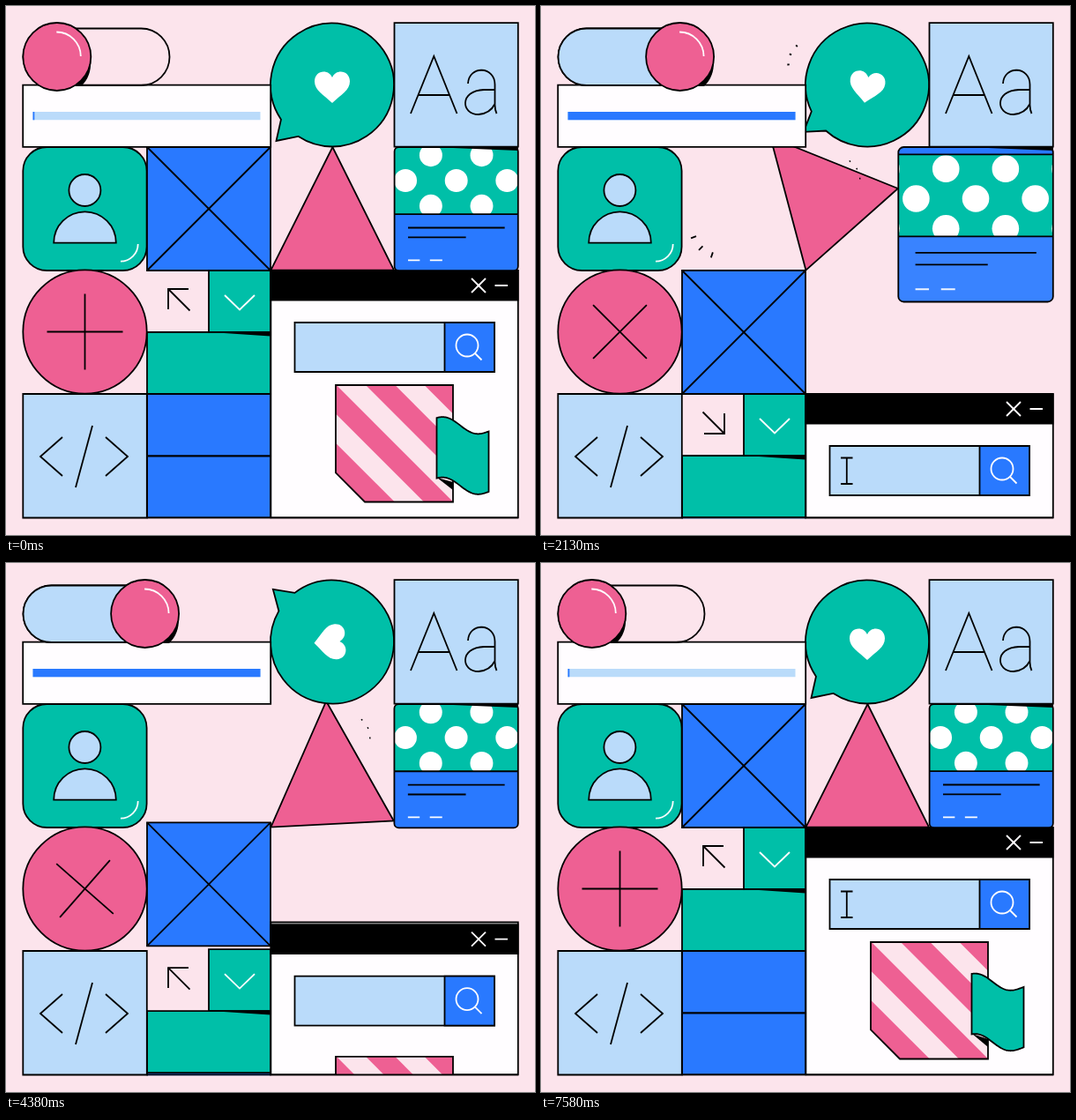
An HTML page with a canvas for the animation above (7.62 s loop, 600 by 600 pixels).

```html
<!DOCTYPE html>
<html lang="en">
<head>
<meta charset="utf-8">
<title>Interface blocks</title>
<style>
html, body { margin: 0; width: 100%; height: 100%; overflow: hidden; background: #fce4ec; }
canvas { display: block; }
</style>
</head>
<body>
<canvas id="stage" width="600" height="600"></canvas>
<script>
const g = document.getElementById('stage').getContext('2d');
const LOOP = 7620, TAU = Math.PI * 2, RAD = Math.PI / 180;
const BG = '#fce4ec', PINK = '#ee6093', GREEN = '#00bfa8', BLUE = '#2979ff',
      SKY = '#badbfa', WHITE = '#fffdff', BLACK = '#000';

const clamp = u => Math.min(1, Math.max(0, u));
const mix = (a, b, u) => a + (b - a) * u;
const easeBy = n => u => u < .5 ? 2 ** (n - 1) * u ** n : 1 - 2 ** (n - 1) * (1 - u) ** n;
const quad = easeBy(2), cubic = easeBy(3);

// 0 to 1 from time a, back to 0 from time b
const swing = (t, a, da, b, db = da, ease = cubic) =>
  ease(clamp((t - a) / da)) - ease(clamp((t - b) / db));

function paint(fill, stroke = BLACK, width = 1.8) {
  if (fill) { g.fillStyle = fill; g.fill(); }
  if (stroke) { g.strokeStyle = stroke; g.lineWidth = width; g.stroke(); }
}
function rect(x, y, w, h, fill, stroke = BLACK, r = 0) {
  g.beginPath();
  g.roundRect(x, y, w, h, r);
  paint(fill, stroke);
}
function circle(x, y, r, fill, stroke = BLACK) {
  g.beginPath();
  g.arc(x, y, r, 0, TAU);
  paint(fill, stroke);
}
function trace(pts) {
  g.beginPath();
  for (let i = 0; i < pts.length; i += 2) g.lineTo(pts[i], pts[i + 1]);
}
function line(stroke, ...pts) { trace(pts); paint(null, stroke); }
function poly(fill, stroke, ...pts) { trace(pts); g.closePath(); paint(fill, stroke); }
function arc(x, y, r, a, b, stroke) {
  g.beginPath();
  g.arc(x, y, r, a * RAD, b * RAD);
  paint(null, stroke);
}
function group(x, y, deg, draw) {
  g.save();
  g.translate(x, y);
  g.rotate(deg * RAD);
  draw();
  g.restore();
}
function clipped(x, y, w, h, draw, r = 0) {
  g.save();
  g.beginPath();
  g.roundRect(x, y, w, h, r);
  g.clip();
  draw();
  g.restore();
}

function toggle(t) {
  const on = swing(t, 100, 500, 5000);
  const x = mix(57.8, 157.6, on);
  rect(19.5, 25.5, 166, 64.5, null, BLACK, 32.2);
  g.globalAlpha = on;
  rect(19.5, 25.5, 166, 64.5, SKY, BLACK, 32.2);
  g.globalAlpha = 1;
  g.beginPath();
  g.moveTo(x + 37.5, 62);
  g.quadraticCurveTo(x + 38, 80, x + 27, 90);
  g.lineTo(x + 18, 90);
  paint(BLACK);
  circle(x, 57.5, 38.5, PINK);
  arc(x - .5, 57, 27.5, -90, 0, WHITE);
}

function progress(t) {
  const v = swing(t, 400, 850, 5700, 1550);
  rect(19.2, 89.6, 281, 70.2, WHITE);
  rect(30.5, 120, 258, 9.3, SKY, null);
  rect(30.5, 120, mix(1.8, 258, v), 9.3, BLUE, null);
}

function bubble(t) {
  group(370, 89.5, 90 * swing(t, 1930, 700, 4233), () => {
    g.beginPath();
    g.arc(0, 0, 70, 146 * RAD, 483.5 * RAD);
    g.lineTo(-63.5, 63.5);
    g.closePath();
    paint(GREEN);
    g.beginPath();
    g.moveTo(0, 20.5);
    g.bezierCurveTo(-10, 11, -20, 6, -20, -4);
    g.bezierCurveTo(-20, -16, -5, -19, 0, -8.5);
    g.bezierCurveTo(5, -19, 20, -16, 20, -4);
    g.bezierCurveTo(20, 6, 10, 11, 0, 20.5);
    paint('#fff', null);
  });
}

function letters() {
  rect(440.5, 19.2, 140.3, 140.5, SKY);
  line(BLACK, 459, 122, 485.3, 57, 511.5, 122);
  line(BLACK, 468, 101, 503, 101);
  g.beginPath();
  g.moveTo(524, 88);
  g.bezierCurveTo(525, 67, 554.5, 68, 554.5, 89);
  g.lineTo(554.5, 112);
  g.quadraticCurveTo(554.5, 118, 556.5, 122);
  g.moveTo(554.5, 95);
  g.lineTo(542, 95);
  g.bezierCurveTo(514, 96, 516, 123, 536, 123);
  g.quadraticCurveTo(549, 122, 554.5, 111);
  paint(null);
}

function profile() {
  rect(19.3, 160, 140.3, 140, GREEN, BLACK, 27);
  circle(89.4, 209, 18, SKY);
  g.beginPath();
  g.arc(89.5, 268.6, 35.3, Math.PI, TAU);
  g.closePath();
  paint(SKY);
  arc(130, 270, 19.7, 0, 90, WHITE);
}

function crossBox(t) {
  const y = 160 + 140 * swing(t, 1093, 700, 4230);
  rect(160, y, 140, 140, BLUE);
  line(BLACK, 160, y, 300, y + 140);
  line(BLACK, 300, y, 160, y + 140);
}

function plus(t) {
  circle(89.5, 369.5, 70.2, PINK);
  group(89.5, 369.5, 45 * swing(t, 1100, 700, 4190), () => {
    line(BLACK, -43, 0, 43, 0);
    line(BLACK, 0, -43, 0, 43);
  });
}

function code() {
  rect(19.3, 440, 140.5, 140.5, SKY);
  line(BLACK, 64, 489, 39, 511, 64, 533);
  line(BLACK, 98, 476, 79, 546);
  line(BLACK, 113, 489, 138, 511, 113, 533);
}

function stack(t) {
  const dy = 140 * swing(t, 1040, 700, 4275);
  clipped(150, 290, 152, 291.2, () => {
    g.translate(0, dy);
    group(196, 333, 180 * swing(t, 700, 400, 3700), () => {
      line(BLACK, 12.5, 12.5, -12, -12);
      line(BLACK, 11, -12, -12, -12, -12, 11);
    });
    rect(230, 300, 70, 70, GREEN);
    line(WHITE, 248, 328, 265, 344.5, 282, 328);
    rect(160, 440, 140, 70.5, BLUE);
    rect(160, 510.5, 140, 70, BLUE);
    rect(160, 370, 140, 70, GREEN);
    poly(BLACK, null, 232, 370, 300, 370, 300, 374.5);
  });
  line(BLACK, 160, 580.4, 300, 580.4);
}

function flag(t) {
  const edge = x => mix(470.5, 482, (x - 488.5) / 59)
    + 6 * Math.sin(TAU * t / 952.5 - .6 - (x - 488.5) / 10.5);
  poly(BLACK, null, 489, edge(489) + 68, 507, 549, 507, 540);
  const top = [], bottom = [];
  for (let x = 488.5; x <= 547.5; x += 1) {
    top.push(x, edge(x));
    bottom.unshift(x, edge(x) + 68.5);
  }
  poly(GREEN, BLACK, ...top, ...bottom);
}

function gift() {
  const shape = [374, 430, 507, 430, 507, 562.5, 407, 562.5, 374, 529.5];
  poly(BG, null, ...shape);
  g.save();
  trace(shape);
  g.clip();
  for (let x = 275; x < 500; x += 66.5)
    poly(PINK, null, x, 430, x + 33.3, 430, x + 173.3, 570, x + 140, 570);
  g.restore();
  poly(null, BLACK, ...shape);
}

function browser(t) {
  const top = 300 + 140 * swing(t, 1231, 700, 4110);
  const dy = 140 * swing(t, 1213, 700, 4116);
  const drop = 160 * swing(t, 1172, 700, 4128);
  rect(300.4, top, 280.4, 580.4 - top, WHITE);
  clipped(299.5, 299, 282.2, 281.5, () => {
    g.save();
    g.translate(0, dy);
    rect(300.4, 300.5, 280.4, 33, BLACK);
    line(WHITE, 528, 309, 544, 325);
    line(WHITE, 544, 309, 528, 325);
    line(WHITE, 554.5, 317, 569, 317);
    rect(327.5, 359, 226.5, 56, SKY);
    rect(497.5, 359, 56.5, 56, BLUE);
    circle(523, 385, 12.5, null, WHITE);
    line(WHITE, 532, 394, 539.5, 401.5);
    if (t / LOOP * 9 % 1 > .28) {
      line(BLACK, 346.8, 373, 346.8, 401.5);
      line(BLACK, 340, 372.5, 353.5, 372.5);
      line(BLACK, 340, 402, 353.5, 402);
    }
    g.restore();
    g.translate(0, drop);
    gift();
    flag(t);
  });
  line(BLACK, 300, 580.4, 581, 580.4);
}

const shade = (from, to, u) =>
  `rgb(${from.map((c, i) => Math.round(mix(c, to[i], u)))})`;

// The growing card stays in touch with the triangle's corner
function card(turn) {
  const x = Math.max(314.8, 300.4 + 140.2 * Math.cos(turn * RAD));
  const size = 580.8 - x, bottom = 160 + size;
  const p = (size - 140.2) / 125.8;
  const part = (a, b) => size * mix(a, b, p);
  const head = 160 + part(0, .169), split = 160 + part(.543, .665);
  const radius = mix(5, 9, p);
  const tint = p * p, blue = [41, 121, 255], pale = [250, 250, 254];
  clipped(x, 160, size, size, () => {
    rect(x, 160, size, size, shade(blue, pale, tint), null);
    rect(x, 160, size, head - 160, BLUE, null);
    g.globalAlpha = clamp(p * 2 - 1);
    circle(x + size * .096, 180, 11.3, SKY, null);
    rect(x + size * .19, 171.3, size * .387, 7.4, '#fff', null);
    line(BLACK, x + size * .19, 187, x + size * .79, 187);
    g.globalAlpha = 1;
    clipped(x, head, size, split - head, () => {
      rect(x, head, size, split - head, GREEN, null);
      const gap = part(.411, .3195), r = part(.0925, .0735);
      const cx = x + size / 2, cy = mix(198, 271, p);
      for (let row = -1; row <= 1; row++)
        for (let col = -2; col <= 2; col++)
          circle(cx + (col + row / 2 * (row ? 1 : 0)) * gap, cy + row * gap / 2, r, '#fff', null);
    });
    if (p > .01) line(BLACK, x, head, x + size, head);
    line(BLACK, x, split, x + size, split);
    const y1 = bottom - part(.3475, .2406), y2 = bottom - part(.27, .1617),
          y3 = bottom - part(.085, .0714), left = x + size * .11;
    line(BLACK, left, y1, x + size * .892, y1);
    line(BLACK, left, y2, x + size * .578, y2);
    const ink = shade([255, 255, 255], blue, tint);
    line(ink, left, y3, x + part(.205, .18), y3);
    line(ink, x + part(.287, .248), y3, x + part(.387, .316), y3);
  }, radius);
  rect(x, 160, size, size, null, BLACK, radius);
  poly(BLACK, null, 470, 159.5, 581, 159.5, 581, 164);
}

function triangle(turn) {
  group(300.4, 299.6, -turn, () => poly(PINK, BLACK, 0, 0, 70, -139.5, 139.6, 0));
}

// x, y, direction, then the start times of each burst
const BURSTS = [
  [308, 66, 204, 1040, 2085, 2930, 5985],
  [386, 198, -24, 1210, 4355],
  [205, 250, 134, 1430, 1885],
  [335, 198, -30, 2105]
];
function sparks(t) {
  for (const [x, y, dir, ...starts] of BURSTS)
    for (const start of starts) {
      const u = (t - start) / 450;
      if (u <= 0 || u >= 1) continue;
      const tail = 26 + 15 * u ** 1.8, tip = 26 + 15 * (1 - (1 - u) ** 1.8);
      for (const spread of [-25, 0, 25]) {
        const a = (dir + spread) * RAD, c = Math.cos(a), s = Math.sin(a);
        line(BLACK, x + c * tail, y + s * tail, x + c * tip, y + s * tip);
      }
    }
}

function frame() {
  const t = performance.now() % LOOP;
  const turn = 90 * swing(t, 1366, 1592, 3334, 1200, quad);
  g.fillStyle = BG;
  g.fillRect(0, 0, 600, 600);
  triangle(turn);
  profile();
  plus(t);
  stack(t);
  crossBox(t);
  code();
  browser(t);
  bubble(t);
  progress(t);
  toggle(t);
  letters();
  card(turn);
  sparks(t);
  requestAnimationFrame(frame);
}
frame();
</script>
</body>
</html>
```
